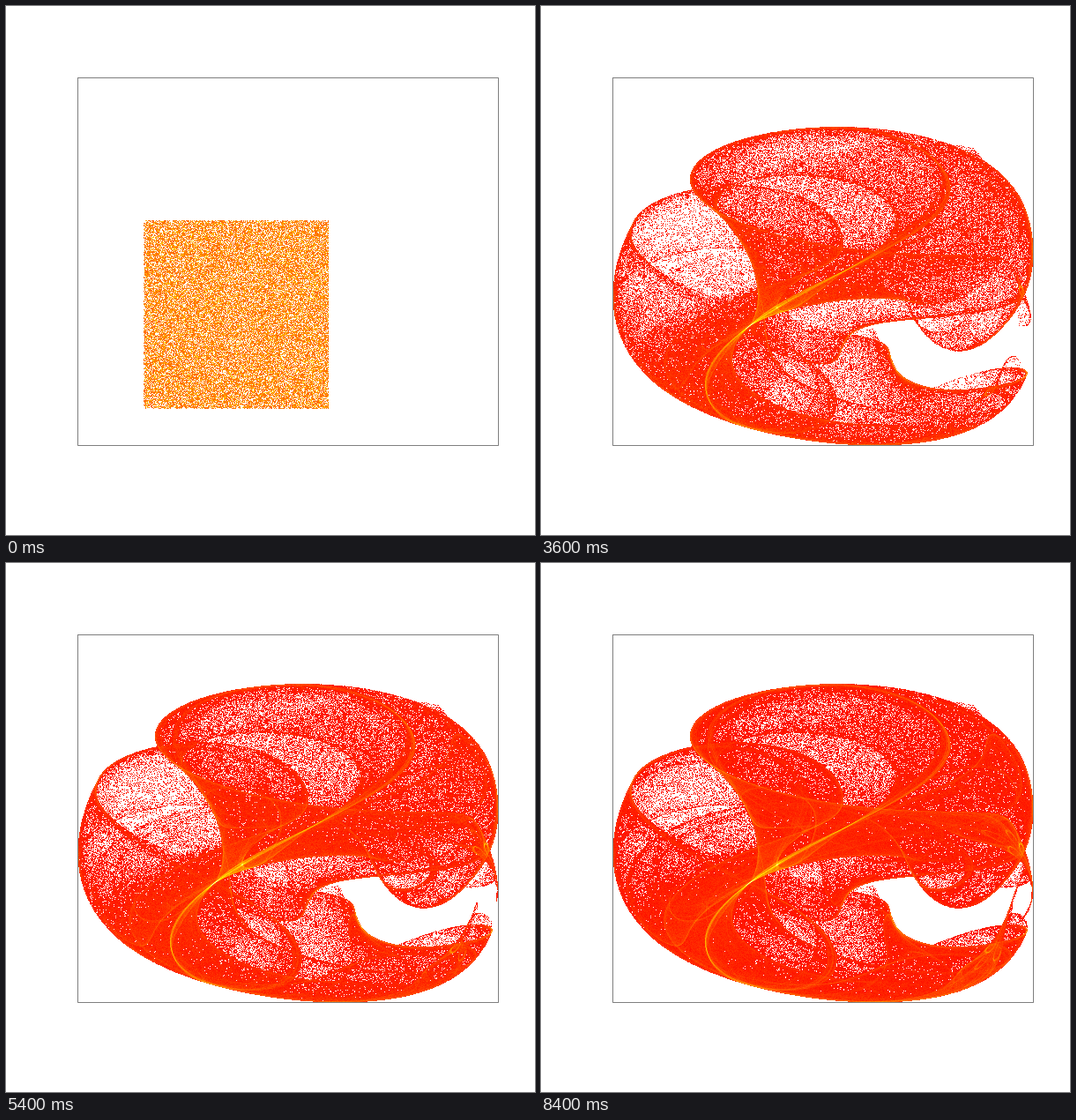
Recreate the animation shown at these times as a matplotlib script. Size 600 px wide and 600 px high, loop 9000 ms.

```python
import numpy as np
import matplotlib.pyplot as plt
from matplotlib.animation import FuncAnimation

SIZE, DPI = 600, 100
FRAMES, STEP = 15, 600
LEFT, RIGHT, TOP, BOTTOM = 82, 558, 82, 498
POINTS = 52000
A, B, C, D = -1.25, -1.0, -1.9, -1.5      # Clifford attractor
X_MAX, Y_MAX = 1 + abs(C), 1 + abs(D)


def clifford(x, y):
    return (np.sin(A * y) + C * np.cos(A * x),
            np.sin(B * x) + D * np.cos(B * y))


def count(x, y):
    """Points per pixel, top row first."""
    grid, _, _ = np.histogram2d(
        -y, x, bins=(BOTTOM - TOP, RIGHT - LEFT),
        range=((-Y_MAX, Y_MAX), (-X_MAX, X_MAX)))
    return grid


def heat(grid):
    """Root of density from red over yellow to white; empty cells are white."""
    p = np.sqrt(grid / grid.max())
    rgb = np.ones(grid.shape + (3,))
    rgb[..., 1] = np.clip(p / 0.75, 0, 1)
    rgb[..., 2] = np.clip((p - 0.75) / 0.25, 0, 1)
    rgb[grid == 0] = 1
    return rgb


def build_images():
    rng = np.random.default_rng(7)
    x = rng.uniform(-1.99, 0.56, POINTS)
    y = rng.uniform(-2.0, 0.56, POINTS)
    images = [heat(count(x, y))]
    total = 0
    for _ in range(FRAMES - 1):
        x, y = clifford(x, y)
        total = total + count(x, y)
        images.append(heat(total))
    return images


images = build_images()

fig = plt.figure(figsize=(SIZE / DPI, SIZE / DPI), dpi=DPI, facecolor="white")
ax = fig.add_axes([0, 0, 1, 1])
picture = ax.imshow(images[0], extent=(LEFT, RIGHT, BOTTOM, TOP),
                    interpolation="nearest", aspect="auto")
x0, x1, y0, y1 = LEFT - 0.5, RIGHT + 0.5, TOP - 0.5, BOTTOM + 0.5
ax.plot([x0, x1, x1, x0, x0], [y0, y0, y1, y1, y0],
        color="#7f7f7f", lw=72 / DPI, solid_joinstyle="miter", snap=False)
ax.set_xlim(0, SIZE)
ax.set_ylim(SIZE, 0)
ax.axis("off")


def update(i):
    picture.set_data(images[i])
    return [picture]


anim = FuncAnimation(fig, update, frames=FRAMES, interval=STEP,
                     repeat=True, repeat_delay=0, blit=False)
plt.show()
```
